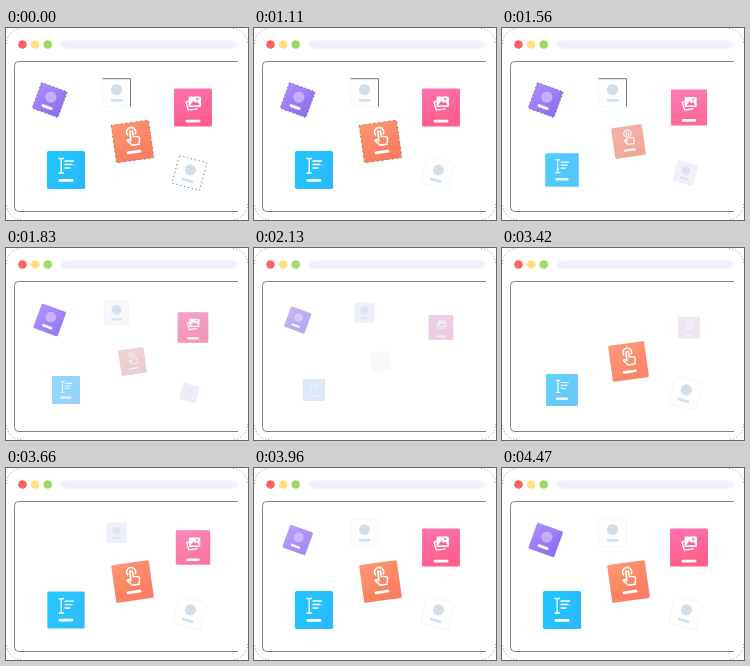
Animation of 242 by 192 pixels, one loop 4500 ms. Source, as an HTML page:

```html
<!DOCTYPE html>
<html lang="en">
<head>
<meta charset="utf-8">
<title>Floating cards</title>
<style>
  html, body { margin: 0; width: 100%; height: 100%; overflow: hidden; background: #fff; }
  svg { display: block; width: 100vw; height: 100vh; }
</style>
</head>
<body>
<svg id="stage" viewBox="0 0 242 192">
  <defs>
    <linearGradient id="purple" x2="1" y2=".6"><stop stop-color="#ac8cfc"/><stop offset="1" stop-color="#9170f3"/></linearGradient>
    <linearGradient id="pink" x2=".3" y2="1"><stop stop-color="#fd72b0"/><stop offset="1" stop-color="#ff5f8a"/></linearGradient>
    <linearGradient id="cyan" x2="1" y2=".5"><stop stop-color="#1fc8fd"/><stop offset="1" stop-color="#2abaff"/></linearGradient>
    <linearGradient id="orange" x2=".4" y2="1"><stop stop-color="#fd9672"/><stop offset="1" stop-color="#fc7d60"/></linearGradient>
    <linearGradient id="white" x2="0" y2="1"><stop stop-color="#fff"/><stop offset="1" stop-color="#fcfdff"/></linearGradient>
  </defs>
  <path d="M.5 16A15 15 0 0 1 15 .5M227 .5A15 15 0 0 1 241.5 16M241.5 176A15 15 0 0 1 227 191.5M15 191.5A15 15 0 0 1 .5 176"
    fill="none" stroke="#666" stroke-width=".7" stroke-dasharray="1 2"/>
  <circle cx="16.5" cy="16.5" r="4.3" fill="#fb6464"/>
  <circle cx="29.2" cy="16.5" r="4.3" fill="#ffdf80"/>
  <circle cx="41.7" cy="16.5" r="4.3" fill="#a0d968"/>
  <rect x="54.5" y="12.5" width="176.5" height="8" rx="4" fill="#eef0fc"/>
  <path d="M232 33.5H12.5a4 4 0 0 0-4 4V179.500a4 4 0 0 0 4 4H232" fill="none" stroke="#777" stroke-width=".9"/>
  <g id="cards"></g>
</svg>
<script>
const LOOP = 4500;
const OUT = { start: 1080, stagger: 130, length: 930 };
const IN = { start: 2900, stagger: 165, length: 780 };

const disc = fill => `<circle cy="-3.2" r="5.6" fill="${fill}"/>`;
const bar = (width, y, fill) =>
  `<rect x="${-width / 2}" y="${y}" width="${width}" height="2.8" rx="1.4" fill="${fill}"/>`;
const line = d =>
  `<path d="${d}" fill="none" stroke="#fff" stroke-width="1.4" stroke-linecap="round" stroke-linejoin="round"/>`;

const icons = {
  avatar: disc('#d3deeb') + bar(12, 6.2, '#d3deeb'),
  purple: disc('#c5adff') + bar(11.5, 6.2, '#fff'),
  touch: `<g transform="translate(0 -1) scale(1.15)">${
    line('M-3.5-5.500a4 4 0 1 1 7 0M-1.2 0v-7.200a1.2 1.2 0 0 1 2.4 0v3.800l4 .8q1.6.5 1.2 2l-1 4.600h-6l-4-4.500q1.2-1.600 3.4.5')
  }</g>` + bar(15, 9.2, '#fff'),
  text: line('M-7-11.500h4.500M-4.800-11.500v14.500M-7 3h4.500M-1-9h8.500M-1-5.500h7M-1-2h5') + bar(15, 9, '#fff'),
  picture: line('M-5-6l-2 .6 2.300 8 9-1.200') +
    '<rect x="-4.500" y="-11" width="12.500" height="10.500" rx="1.2" fill="#fff"/>' +
    '<path d="M-3-2.200l3.500-4.500 2 2.200 1.700-1.600 2.500 3.900z" fill="#ff6496"/><circle cx="4.500" cy="-8.400" r="1.1" fill="#ff6496"/>' +
    bar(15, 12.2, '#fff')
};

// Listed in the order they leave and return.
const cards = [
  { x: 183.5, y: 145, size: 28.5, turn: 15, fill: 'white', icon: 'avatar', dash: '1 3' },
  { x: 126.5, y: 113.5, size: 38, turn: -8, fill: 'orange', icon: 'touch', dash: '1 4' },
  { x: 60, y: 142, size: 38, turn: 0, fill: 'cyan', icon: 'text' },
  { x: 187, y: 79.5, size: 38, turn: 0, fill: 'pink', icon: 'picture' },
  { x: 110.5, y: 64.7, size: 28, turn: 0, fill: 'white', icon: 'avatar', dash: 'none' },
  { x: 43.7, y: 72, size: 27.5, turn: 20, fill: 'purple', icon: 'purple', dash: '1 3' }
];

function buildCard({ size, fill, icon, dash }) {
  const h = size / 2;
  const square = attrs => `<rect x="${-h}" y="${-h}" width="${size}" height="${size}" rx="1.5" ${attrs}/>`;
  const edge = `M${-h} ${-h}H${h}V${h}` + (dash === 'none' ? '' : `H${-h}Z`);
  const side = fill === 'white' ? '#f2f4fa' : 'none';
  return `<g>${square(`fill="url(#${fill})" stroke="${side}" stroke-width=".8"`)}${icons[icon]}
    ${square('class="haze" fill="#c8ccec"')}
    <path class="edge" d="${dash ? edge : ''}" fill="none" stroke="#444" stroke-width=".7" stroke-dasharray="${dash}"/></g>`;
}

const layer = document.getElementById('cards');
layer.innerHTML = cards.map(buildCard).join('');
const nodes = [...layer.children].map(group => ({
  group,
  haze: group.querySelector('.haze'),
  edge: group.querySelector('.edge')
}));

const progress = (t, phase, i) =>
  Math.min(1, Math.max(0, (t - phase.start - i * phase.stagger) / phase.length));
const easeOut = p => 1 - (1 - p) ** 4;

function render(t) {
  cards.forEach(({ x, y, turn }, i) => {
    const leaving = progress(t, OUT, i);
    const shown = t < IN.start ? 1 - leaving : easeOut(progress(t, IN, i));
    const { group, haze, edge } = nodes[i];
    group.setAttribute('transform', `translate(${x} ${y}) rotate(${turn}) scale(${0.5 + shown / 2})`);
    group.setAttribute('opacity', Math.sqrt(shown));
    haze.setAttribute('opacity', (1 - shown) ** 1.5);
    edge.setAttribute('opacity', leaving === 0 ? 1 : 0);
  });
}

const begin = performance.now();
function tick() {
  render((performance.now() - begin) % LOOP);
  requestAnimationFrame(tick);
}
render(0);
requestAnimationFrame(tick);
</script>
</body>
</html>
```
